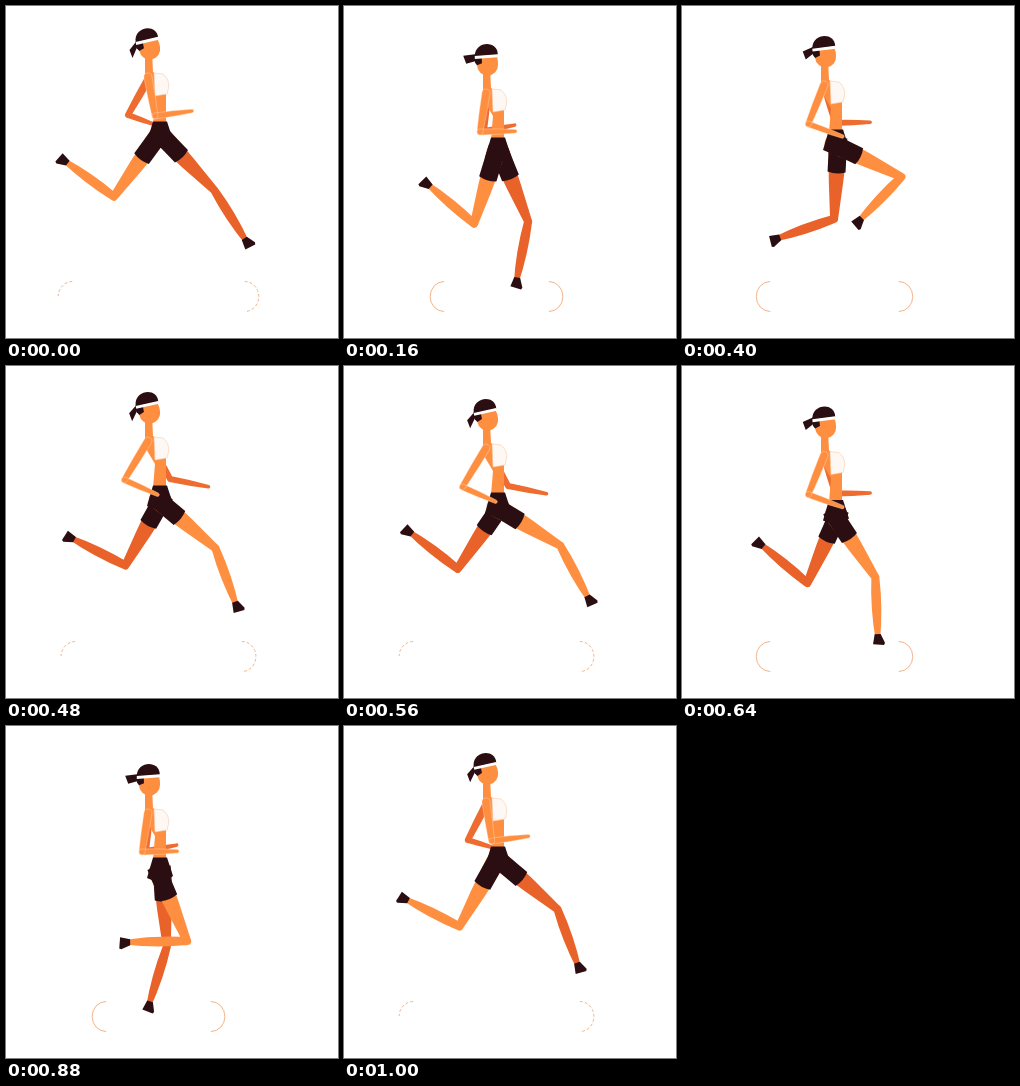
Write an HTML page that moves like this. It is 332x332 px and loops after 1040 ms.

```html
<!DOCTYPE html>
<html lang="en">
<head>
<meta charset="utf-8">
<title>Runner</title>
<style>
html, body { margin: 0; width: 100%; height: 100%; overflow: hidden; background: #fff; }
svg { display: block; width: 100vw; height: 100vh; }
</style>
</head>
<body>
<svg id="stage" viewBox="0 0 332 332"></svg>
<script>
(() => {
  const PERIOD = 1040, STEP = 40, HALF = PERIOD / 2;
  const THIGH = 75, SHIN = 63;
  const LIGHT = '#ff8f40', DARK = '#e8622a', INK = '#2a0e11', WHITE = '#fff';

  // Key poses of one leg: time, thigh and shin angle from straight down, forward positive
  const STRIDE = [
    [0, -36, -126], [240, -3, -131], [350, 16, -96], [400, 64, -44],
    [480, 50, 20], [520, 44, 32], [560, 59, 28], [680, 22, -11],
    [760, 17, -28], [870, 5, -12], [920, -3, -71]
  ];
  // Time and top of the head
  const BOUNCE = [
    [0, 22], [160, 38], [240, 48], [400, 30], [480, 26],
    [560, 33], [760, 48], [880, 38], [1000, 27]
  ];

  const stage = document.getElementById('stage');
  const set = (el, name, value) => el.setAttribute(name, value);
  function create(tag, parent = stage) {
    const el = document.createElementNS('http://www.w3.org/2000/svg', tag);
    parent.append(el);
    return el;
  }
  function add(fill, parent, d = '') {
    const path = create('path', parent);
    set(path, 'fill', fill);
    set(path, 'd', d);
    return path;
  }
  const makeLeg = color => ({ skin: add(color), shoe: add(INK), shorts: add(INK) });

  const shadow = add('none');
  set(shadow, 'stroke', '#f2b48c');
  const farArm = add('#ee6c30');
  const farLeg = makeLeg(DARK);
  const torso = create('g');
  add(LIGHT, torso, 'M139 24H146L147 44L160 52V96H147L149 72L139 55Z');
  const nearLeg = makeLeg(LIGHT);
  const chest = create('g');
  add(INK, chest, 'M147 93.5H161L167 112L155 120L141 114Z');
  const bra = add('#fdf8f4', chest, 'M148 45L157 46Q164 52 162.5 60L161 66L149 68Z');
  set(bra, 'stroke', '#f8cba8');
  set(bra, 'stroke-width', 0.6);
  const nearArm = add(LIGHT);
  set(nearArm, 'stroke', '#ffdcc0');
  set(nearArm, 'stroke-width', 0.4);
  const ponytail = add(INK);
  const head = create('g');
  add(LIGHT, head, 'M133 17A10.5 10.5 0 0 1 154 17V21A10.5 10.5 0 0 1 133 21Z');
  add(INK, head, 'M131 11H138V19L133 21L131 18Z');
  add(INK, head, 'M131 12C131 -4 155 -4 154 11Z');
  add(WHITE, head, 'M131 11.5L154 10.5V13.5L131 14.5Z');

  // Monotone cubic through one column of keys, wrapping at the period
  function sample(keys, col, time) {
    const t = time % PERIOD, n = keys.length;
    const i = keys.findLastIndex(key => key[0] <= t);
    const at = k => [keys[(k + n) % n][0] + Math.floor(k / n) * PERIOD, keys[(k + n) % n][col]];
    const [a, b, c, d] = [at(i - 1), at(i), at(i + 1), at(i + 2)];
    const slope = (p, q) => (q[1] - p[1]) / (q[0] - p[0]);
    const tangent = (s, r) => s * r <= 0 ? 0 : 2 * s * r / (s + r);
    const mid = slope(b, c), span = c[0] - b[0], rise = c[1] - b[1], u = (t - b[0]) / span;
    const m0 = tangent(slope(a, b), mid) * span, m1 = tangent(mid, slope(c, d)) * span;
    return b[1] + u * (m0 + u * (3 * rise - 2 * m0 - m1 + u * (m0 + m1 - 2 * rise)));
  }

  // Point at a distance along and across a bone that hangs at the given angle
  function along([x, y], angle, distance, across = 0) {
    const sin = Math.sin(angle * Math.PI / 180), cos = Math.cos(angle * Math.PI / 180);
    return [x + sin * distance + cos * across, y + cos * distance - sin * across];
  }

  // Tapered limb with rounded ends; widths at start, middle and end
  function limb([ax, ay], [bx, by], wa, wm, wb) {
    const len = Math.hypot(bx - ax, by - ay);
    const nx = (ay - by) / len / 2, ny = (bx - ax) / len / 2;
    const wc = 2 * wm - (wa + wb) / 2, mx = (ax + bx) / 2, my = (ay + by) / 2;
    const p = (x, y, w) => `${x + nx * w} ${y + ny * w}`;
    return `M${p(ax, ay, -wa)}Q${p(mx, my, -wc)} ${p(bx, by, -wb)}` +
      `A${wb / 2} ${wb / 2} 0 0 1 ${p(bx, by, wb)}` +
      `Q${p(mx, my, wc)} ${p(ax, ay, wa)}A${wa / 2} ${wa / 2} 0 0 1 ${p(ax, ay, -wa)}Z`;
  }

  function drawLeg(leg, hip, phase) {
    const thigh = sample(STRIDE, 1, phase), shin = sample(STRIDE, 2, phase);
    const knee = along(hip, thigh, THIGH), foot = along(knee, shin, SHIN);
    const cloth = (distance, across) => along(hip, thigh, distance, across);
    const sole = (toe, down) => along(foot, shin, down, toe);
    set(leg.skin, 'd', limb(hip, knee, 19, 14.5, 8) + limb(knee, foot, 8, 9.5, 4.5));
    set(leg.shorts, 'd', `M${cloth(-6, -9)}L${cloth(28, -9)}Q${cloth(31, 0)} ${cloth(28, 9)}L${cloth(-6, 9)}Z`);
    set(leg.shoe, 'd', `M${sole(-3, -6)}L${sole(3, -6)}L${sole(7, 3)}L${sole(6, 5)}L${sole(-5, 4)}Z`);
  }

  function drawArm(arm, shoulder, elbow, hand) {
    set(arm, 'd', limb(shoulder, elbow, 8, 7.5, 6) + limb(elbow, hand, 6, 5.5, 3.5));
  }

  function drawShadow(width) {
    const left = 152.5 - width / 2, right = 152.5 + width / 2, wide = width > 193;
    const leftEnd = wide ? `${left} 290` : `${left + 14} 305.5`;
    set(shadow, 'd', `M${left + 14} 275.5A14 15 0 0 0 ${leftEnd}` +
      `M${right - 14} 275.5A14 15 0 0 1 ${right - 14} 305.5`);
    set(shadow, 'stroke-dasharray', wide ? '3 2' : 'none');
  }

  function draw(t) {
    const swing = Math.cos(2 * Math.PI * t / PERIOD), snap = swing ** 3, lift = swing ** 2;
    const y = sample(BOUNCE, 1, t), shift = `translate(0 ${y})`;
    const drop = 10 + 15 * lift;

    drawShadow(150.5 + 50 * Math.cos(4 * Math.PI * t / PERIOD));
    set(torso, 'transform', shift);
    set(chest, 'transform', shift);
    set(head, 'transform', `${shift} rotate(${(13 - drop) * 0.9} 144 20)`);
    set(ponytail, 'd', `M133 ${y + 10}L${113 + drop * 0.42} ${y + drop - 3}` +
      `L${116 + drop * 0.42} ${y + drop + 5}L132 ${y + 17}Z`);

    // The legs trade colours briefly while they pass each other
    const phase = t + (t > 800 && t < 940 ? HALF : 0);
    drawLeg(farLeg, [156, y + 108], phase + HALF);
    drawLeg(nearLeg, [152, y + 108], phase);

    drawArm(farArm, [143, y + 50], [144 - 22 * snap, y + 87], [176 - 29 * snap, y + 74 + 22 * lift]);
    drawArm(nearArm, [142, y + 49], [133 + 16 * snap, y + 88], [168 + 18 * snap, y + 93 - 10 * swing]);
  }

  const start = performance.now();
  function tick() {
    const t = (performance.now() - start) % PERIOD;
    draw(Math.floor(t / STEP) * STEP);
    requestAnimationFrame(tick);
  }
  tick();
})();
</script>
</body>
</html>
```
